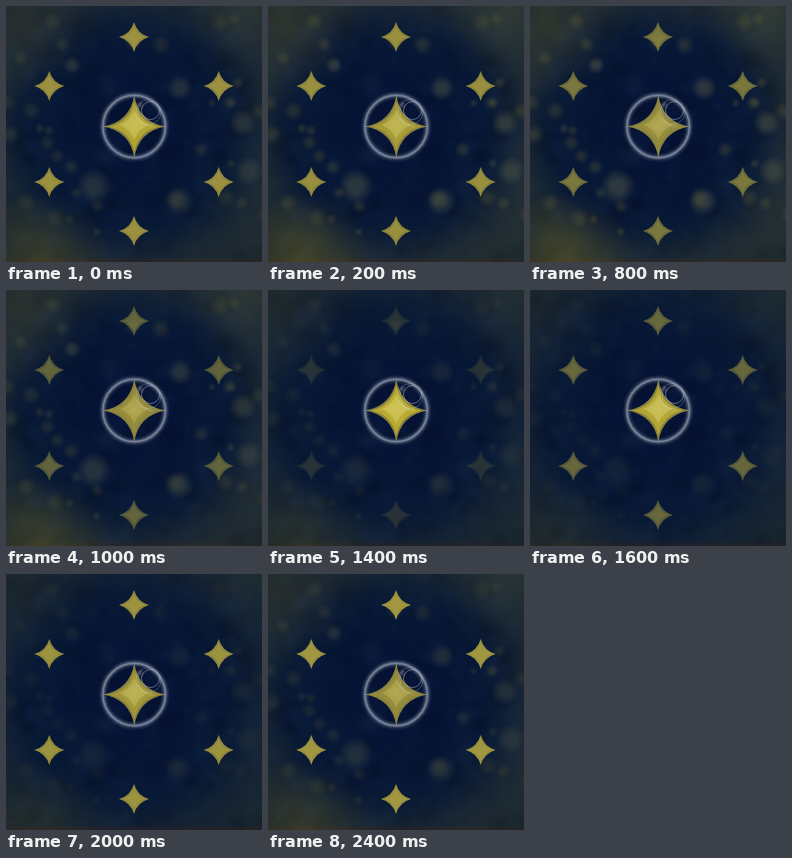
Animation of 256x256 px, one loop 2600 ms. Source, as an HTML page with a canvas:

```html
<!DOCTYPE html>
<html lang="en">
<head>
<meta charset="utf-8">
<title>Stars</title>
<style>
html, body { margin: 0; width: 100%; height: 100%; overflow: hidden; background: #07142f; }
canvas { display: block; width: 100vw; height: 100vh; }
</style>
</head>
<body>
<canvas id="stage" width="256" height="256"></canvas>
<script>
const ctx = document.getElementById('stage').getContext('2d');
const STEP = 200, LOOP = 2600, TAU = 2 * Math.PI;

let seed = 17;
const rand = (lo, hi) => {
  seed = seed * 16807 % 2147483647;
  return lo + (hi - lo) * seed / 2147483647;
};

// Linear track through [time, value] points
const track = (...keys) => t => {
  const i = keys.findIndex(k => k[0] > t);
  if (i < 0) return keys[keys.length - 1][1];
  const [t0, a] = keys[i - 1], [t1, b] = keys[i];
  return a + (b - a) * (t - t0) / (t1 - t0);
};
const haze = track([0, .65], [400, 1], [600, 1], [1800, .1], [2200, .52], [LOOP, .65]);
const outer = track([0, .9], [600, .82], [1400, .16], [1800, .88], [LOOP, 1]);
const heart = track([0, .8], [500, .1], [1000, .1], [1400, 1], [1800, .7], [2200, .1], [LOOP, .1]);

function glow(c, x, y, r, rgb, alpha, core = 0) {
  const g = c.createRadialGradient(x, y, 0, x, y, r);
  g.addColorStop(0, `rgba(${rgb},${alpha})`);
  g.addColorStop(core, `rgba(${rgb},${alpha})`);
  g.addColorStop(1, `rgba(${rgb},0)`);
  c.fillStyle = g;
  c.fillRect(x - r, y - r, 2 * r, 2 * r);
}

function layer(draw) {
  const el = document.createElement('canvas');
  el.width = el.height = 256;
  draw(el.getContext('2d'));
  return el;
}

const sky = layer(c => {
  const g = c.createRadialGradient(128, 122, 20, 128, 122, 185);
  g.addColorStop(0, '#051336');
  g.addColorStop(.55, '#081935');
  g.addColorStop(1, '#18262f');
  c.fillStyle = g;
  c.fillRect(0, 0, 256, 256);
  for (let i = 0; i < 260; i++)
    glow(c, rand(0, 256), rand(0, 256), rand(5, 17), i % 2 ? '0,6,24' : '24,46,76', .17);
  c.fillStyle = 'rgba(45,28,28,.4)';
  c.fillRect(0, 253, 256, 3);
});

const bokeh = layer(c => {
  // Mist around the rim, warmest at the lower left
  for (let a = 0; a < TAU; a += TAU / 16)
    glow(c, 128 + 148 * Math.cos(a), 128 + 148 * Math.sin(a), rand(45, 65), '88,86,50', .3);
  glow(c, 35, 255, 70, '112,102,34', .55);
  glow(c, 240, 0, 60, '90,96,66', .4);
  glow(c, 15, 15, 80, '92,90,52', .35);

  const large = [[88, 180, 18], [173, 195, 15], [174, 82, 13], [237, 117, 14], [243, 165, 15], [66, 59, 9]];
  for (const [x, y, r] of large) glow(c, x, y, r, '92,98,74', .5, .35);
  for (let i = 0; i < 45; i++) {
    const a = rand(0, TAU), d = rand(65, 165);
    glow(c, 128 + d * Math.cos(a), 124 + d * Math.sin(a), rand(4, 11), '112,108,56', .3, .25);
  }
});

function star(x, y, r, pinch, fill) {
  const k = r * pinch;
  ctx.beginPath();
  ctx.moveTo(x, y - r);
  ctx.quadraticCurveTo(x + k, y - k, x + r, y);
  ctx.quadraticCurveTo(x + k, y + k, x, y + r);
  ctx.quadraticCurveTo(x - k, y + k, x - r, y);
  ctx.quadraticCurveTo(x - k, y - k, x, y - r);
  ctx.fillStyle = fill;
  ctx.fill();
}

function ring(x, y, r, width, alpha, from = 0, to = TAU) {
  ctx.beginPath();
  ctx.arc(x, y, r, from, to);
  ctx.lineWidth = width;
  ctx.strokeStyle = `rgba(215,222,232,${alpha})`;
  ctx.stroke();
}

function centre(level) {
  star(128.3, 120.5, 31, .15, '#8a823f');
  star(128.3, 120.5, 25, .18, `rgba(193,178,48,${.1 + .75 * level})`);
  star(128.3, 119, 15, .25, `rgba(218,207,105,${.25 + .25 * level})`);
  glow(ctx, 128.3, 119, 13, '228,219,140', .2);

  for (const [width, alpha] of [[8, .07], [5, .13], [3, .2], [1.3, .3]])
    ring(128.2, 120.5, 31.2, width, alpha);

  ring(142.5, 106, 12.5, 1, .25);
  ring(144.5, 104.5, 9, 1, .42);
  ring(147, 106, 15, 1, .22, 1.6, 3.8);
  glow(ctx, 134, 99, 5, '240,240,225', .2);
}

function outerStars(alpha) {
  ctx.globalAlpha = alpha;
  for (const dx of [-1, 0, 1])
    for (const side of [-1, 1]) {
      const x = 128 + 84.7 * dx, y = 128 + side * (dx ? 48 : 97);
      star(x, y, 15, .22, '#9e943f');
      star(x, y, 11, .22, 'rgba(182,170,70,.35)');
    }
  ctx.globalAlpha = 1;
}

function frame(now) {
  const t = Math.floor(now % LOOP / STEP) * STEP;
  ctx.drawImage(sky, 0, 0);
  ctx.globalAlpha = haze(t);
  ctx.drawImage(bokeh, 0, 0);
  outerStars(outer(t));
  centre(heart(t));
  requestAnimationFrame(frame);
}
requestAnimationFrame(frame);
</script>
</body>
</html>
```
